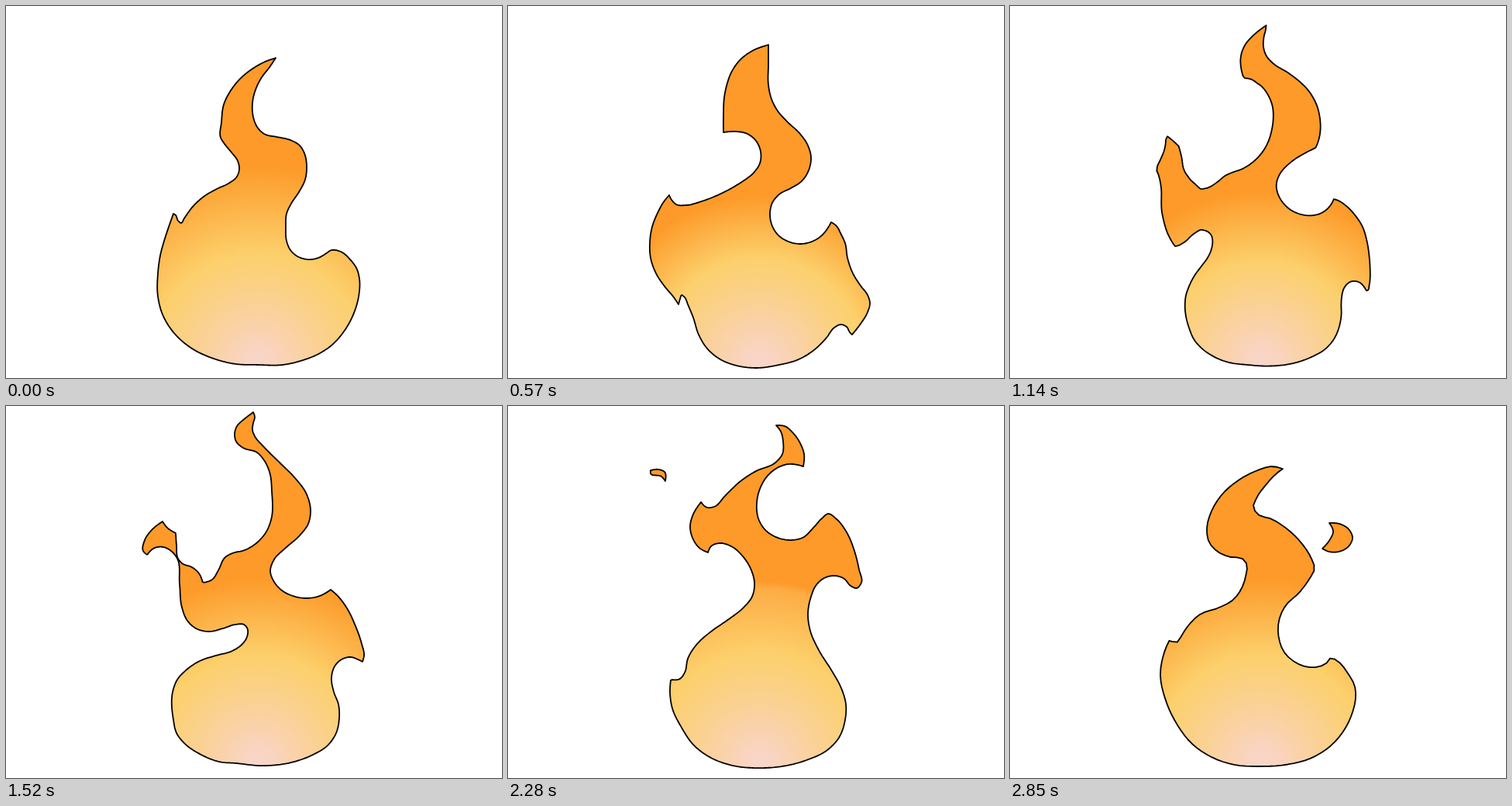
Write an HTML page with a canvas that moves like this. It is 640 px wide and 480 px high and loops after 3.04 s.

```html
<!DOCTYPE html>
<html lang="en">
<head>
<meta charset="utf-8">
<title>Flame</title>
<style>
  html, body { margin: 0; width: 100%; height: 100%; overflow: hidden; background: #fff; }
  canvas { display: block; }
</style>
</head>
<body>
<canvas id="stage" width="640" height="480"></canvas>
<script>
const ctx = document.getElementById('stage').getContext('2d');
const HOLD = 190;

// Points run clockwise from the tip. ^ is a sharp corner, * a landmark shared by all body poses:
// tip, right horn, right barb, base, left barb, left horn, tongue.
const BODY = {
  calm: `348,67^* 340,79 330,92 322,108 318,125 319,143 324,156 333,165 350,169 367,173 379,180 385,190
    388,208 386,224 378,240 368,255 362,268 361,285 362,303 367,315 376,323 389,327 403,325 412,320
    420,315* 432,317 444,327 453,340 456,352* 455,375 449,396 436,420 421,437 405,448 380,458 357,463
    325,463* 297,462 268,455 240,442 216,421 202,398 196,375 196,345* 199,322 205,300 211,282
    216,268^* 219,270 222,277 226,280 230,274 240,260 255,246 272,236 287,229 298,220 301,210 299,200
    291,189 282,178 277,170* 278,150 281,127 290,109 303,93 318,81 334,72`,
  barbs: `336,50^* 336,75 336,102 340,120 347,134 360,149 376,164 386,178 391,195 388,212 379,226 365,235
    350,243 341,254 338,268 341,284 349,296 362,304 377,307 392,304 405,296 413,286 417,279^* 423,283
    430,295 435,306 438,325 445,345 455,361 464,373 467,383 464,395 455,410 444,424^* 441,421 437,414
    429,411 421,415 411,428 396,443 375,456 350,463 318,467* 295,464 274,456 257,442 246,424 239,402
    232,385 228,376 224,373 222,378 220,385^* 214,376 203,363 191,345 184,325 183,305 186,285 194,265
    200,254 208,244^* 211,250 217,256 230,257 250,252 275,242 300,228 318,214 325,203 326,188 320,174
    309,165 295,162 278,163^* 278,140 279,118 282,103 289,84 300,69 315,58`,
  arms: `340,39^* 336,48 334,63 334,73 337,83 346,92 366,100 385,112 397,125 404,141 407,163 406,184
    401,203^ 385,206 369,213 354,226 346,243 348,260 357,275 370,285 386,289 402,286 412,277 416,268
    417,259^* 424,260 437,267 452,281 464,299 469,320 470,350 468,375 465,390 463,398 460,398^* 460,390
    457,381 448,376 440,380 434,391 428,407 417,429 402,445 384,455 363,462 330,465* 300,463 275,456
    256,442 241,421 233,397 229,372 226,340 222,318 216,301 208,294 202,299 198,315 196,337^* 187,326
    178,310 173,296 172,280 176,260 184,243 196,228 207,217 211,206 209,196 204,188 204,184^* 210,186
    218,197 224,211 225,225 225,236 233,242 250,242 267,240 291,231 313,215 329,196 337,178 337,164
    331,148 324,137 318,129 312,130 309,135 305,134^* 300,120 297,104 298,88 303,74 313,61 326,49`,
  wing: `319,8^* 321,14 319,22 318,31 321,39 332,52 351,71 373,93 387,112 393,135 390,152 379,167 361,183
    346,198 341,213 346,227 356,238 370,245 387,248 405,245 419,237^* 428,245 440,261 451,284 459,307
    462,322 460,330^* 454,327 445,324 433,327 424,336 420,350 423,369 429,385 430,402 426,422 415,438
    396,450 372,459 325,464* 298,461 275,459 250,449 230,435 220,422 216,405 216,365 221,353 231,342
    250,329 271,322 292,316 306,306 311,298 311,286 307,282 296,282 280,287 262,291 245,287 234,277*
    227,260 224,230 220,195 213,187 203,182 192,183 182,192^ 177,187 179,173 188,160 202,149^* 208,157
    219,164^ 220,180 222,197 227,203 240,208 249,216 254,228^ 266,224 274,212 283,195 292,190 308,186
    323,177 336,162 342,147 343,110 340,85 333,70 324,60 306,54 297,46 295,36* 298,26 306,18 315,11`,
  split: `293,1^* 299,8 301,19 301,37 305,48 320,64 341,78 357,88 365,103 361,120 349,138 333,155 321,170
    318,185 321,203 331,224 346,240 362,247 383,248 392,244 400,232^* 411,235 424,246 433,260 438,276
    440,300 442,318 441,326^* 434,322 422,319 412,324 408,335 411,350 421,364 428,378 430,398 426,420
    416,438 403,448 382,455 330,465* 300,463 267,457 244,446 227,430 217,410 211,385 211,360 218,346
    232,332 252,322 280,313 300,306 310,295 311,283 305,269 292,260 275,258 262,263 257,273 256,282^*
    245,277 230,262 217,242 211,222 211,208 214,202^* 219,205 227,205 240,194 255,180 275,165 300,155
    308,148 314,135 321,110 320,90 314,70 304,55 291,43 276,35^* 279,22 285,9`,
  hook: `381,78^* 374,76 362,75 349,79 335,90 325,107 321,125 323,145 332,160 348,170 366,173 380,170
    395,156 405,145 413,139* 424,146 437,163 447,187 453,211 456,228 450,235* 442,232 434,223 422,219
    408,222 397,232 391,246 387,268 390,290 401,315 418,342 430,364 436,385 435,405 427,428 412,444
    385,457 317,467* 290,464 262,454 240,438 224,415 212,390 209,370 210,353^ 222,352 228,344 232,326
    244,307 262,291 285,275 305,259 315,246 318,228 314,212 303,194 288,181 272,177 262,181 258,189^*
    248,184 238,170 235,155 238,142 249,124^* 257,131 266,130 280,116 300,97 320,84 345,73 354,62
    355,46 352,33 346,25^* 357,26 368,35 377,48 382,62`,
  shed: `322,92^* 312,105 308,120 315,135 335,145 360,155 380,168 392,185 396,200 390,214 378,230 366,250
    362,275 370,300 385,320 405,333 425,350 440,370 443,390 434,415 415,440 385,456 322,466 280,461
    248,446 222,420 205,390 197,360 198,335 203,322^ 210,328 219,320 235,300 260,280 290,260 305,240
    308,220 300,203 280,196 258,190 246,175 245,152 256,128 275,110 300,97`,
  curl: `352,81^* 344,87 330,102 318,119 314,131 319,139 338,146 358,159 377,178 389,197 393,210 387,222
    373,241 356,257 347,277 347,300 354,318 367,330 385,337 400,336 408,332 414,324^ 424,330 436,345
    445,362 446,376 441,398 430,420 412,440 387,455 355,463 325,465 285,462 258,452 234,435 215,410
    201,380 194,345 197,325 202,310 207,300^ 210,305 215,305 222,295 231,282 245,269 270,260 288,250
    299,235 304,220 305,203 300,197 285,195 268,188 257,176 254,158 259,138 272,116 293,97 317,84 340,78`
};

// Loose sparks
const SPARK = {
  left: `163,182^* 164,170 169,158 178,152 195,152 203,156 204,170 207,187 210,192 208,196 199,193 190,183
    183,171 176,168 169,172`,
  ember: '184,83^* 195,82 202,85 203,97^ 198,91 184,87',
  top: '350,7^* 366,16 376,34 374,48^ 362,40 356,26',
  rising: '408,128^* 425,131 439,143 445,161 440,178^ 424,176 408,181^ 416,165 415,145',
  right: '412,151^* 425,152 437,159 442,170 437,181 424,188 412,188 403,184^ 413,172 417,162'
};

// Each step: glow radii [yellow, orange], then shapes as [name, next, share]
const STEPS = [
  [[140, 255], ['calm']],
  [[135, 240], ['calm', 'barbs', .55]],
  [[135, 228], ['calm', 'barbs', .8]],
  [[135, 215], ['barbs']],
  [[132, 215], ['barbs', 'arms', .5]],
  [[128, 215], ['arms']],
  [[130, 222], ['arms', 'wing', .45]],
  [[132, 230], ['arms', 'wing', .8]],
  [[138, 238], ['wing']],
  [[138, 230], ['split']],
  [[138, 238], ['split']],
  [[140, 234], ['split', 'hook', .6], ['left', 'ember', .85]],
  [[142, 234, 224], ['hook'], ['ember']],
  [[142, 244], ['hook'], ['ember']],
  [[140, 236], ['shed'], ['top'], ['rising']],
  [[138, 238], ['curl'], ['right']]
];
STEPS[9].push(['left']);
STEPS[10].push(['left']);

const mix = (a, b, t) => a + (b - a) * t;
const dist = (a, b) => Math.hypot(b.x - a.x, b.y - a.y);
const slope = (a, b) => {
  const h = dist(a, b);
  return { x: (b.x - a.x) / h, y: (b.y - a.y) / h, h };
};

// Smooth closed curve, cut at its landmarks into evenly sampled sections
function trace(text) {
  const pts = text.trim().split(/\s+/).map(s => {
    const [x, y] = s.split(',').map(parseFloat);
    return { x, y, sharp: s.includes('^'), mark: s.includes('*') };
  });
  const n = pts.length;
  const spans = pts.map((p, i) => slope(p, pts[(i + 1) % n]));
  const tangent = (i, k) => {
    const a = spans[(i + n - 1) % n], b = spans[i];
    return (a[k] * b.h + b[k] * a.h) / (a.h + b.h);
  };
  const sections = [];
  pts.forEach((p, i) => {
    const j = (i + 1) % n, q = pts[j], v = spans[i];
    if (p.mark) sections.push([]);
    const at = (u, k) => {
      let s = p.sharp ? null : tangent(i, k), e = q.sharp ? null : tangent(j, k);
      if (s === null) s = e === null ? v[k] : (3 * v[k] - e) / 2;
      if (e === null) e = (3 * v[k] - s) / 2;
      const w = 1 - u;
      return p[k] * w * w * (1 + 2 * u) + q[k] * u * u * (3 - 2 * u) + v.h * u * w * (s * w - e * u);
    };
    for (let m = 0; m < 8; m++) sections.at(-1).push({ x: at(m / 8, 'x'), y: at(m / 8, 'y') });
  });
  return sections.map((s, i) => resample([...s, sections[(i + 1) % sections.length][0]], 160));
}

function resample(line, count) {
  const len = [0];
  for (let i = 1; i < line.length; i++) len.push(len[i - 1] + dist(line[i - 1], line[i]));
  const out = [];
  for (let c = 0, i = 1; c < count; c++) {
    const d = len.at(-1) * c / count;
    while (len[i] < d) i++;
    const t = (d - len[i - 1]) / (len[i] - len[i - 1]);
    out.push({ x: mix(line[i - 1].x, line[i].x, t), y: mix(line[i - 1].y, line[i].y, t) });
  }
  return out;
}

const shapes = {};
for (const [name, text] of Object.entries({ ...BODY, ...SPARK })) shapes[name] = trace(text).flat();

function outline([name, next, t]) {
  const a = shapes[name], b = shapes[next] || a;
  const path = new Path2D();
  a.forEach((p, i) => path.lineTo(mix(p.x, b[i].x, t || 0), mix(p.y, b[i].y, t || 0)));
  path.closePath();
  return path;
}

function glow([yellow, orange, edge]) {
  const g = ctx.createRadialGradient(325, 460, 0, 325, 460, 300);
  const stop = (r, color) => g.addColorStop(r / 300, color);
  stop(0, '#f8d5cb');
  stop(20, '#f9d4c0');
  stop(75, '#fad196');
  stop(yellow, '#fcd06c');
  if (edge) stop(edge, '#fdac44');
  stop(orange, '#fd9a29');
  return g;
}

function draw(now) {
  const [radii, ...parts] = STEPS[Math.floor(now / HOLD) % STEPS.length];
  ctx.fillStyle = '#fff';
  ctx.fillRect(0, 0, 640, 480);
  ctx.fillStyle = glow(radii);
  ctx.strokeStyle = '#000';
  ctx.lineWidth = 1.8;
  ctx.lineJoin = 'round';
  for (const part of parts) {
    const path = outline(part);
    ctx.fill(path);
    ctx.stroke(path);
  }
}

function tick() {
  draw(performance.now());
  requestAnimationFrame(tick);
}
tick();
</script>
</body>
</html>
```
